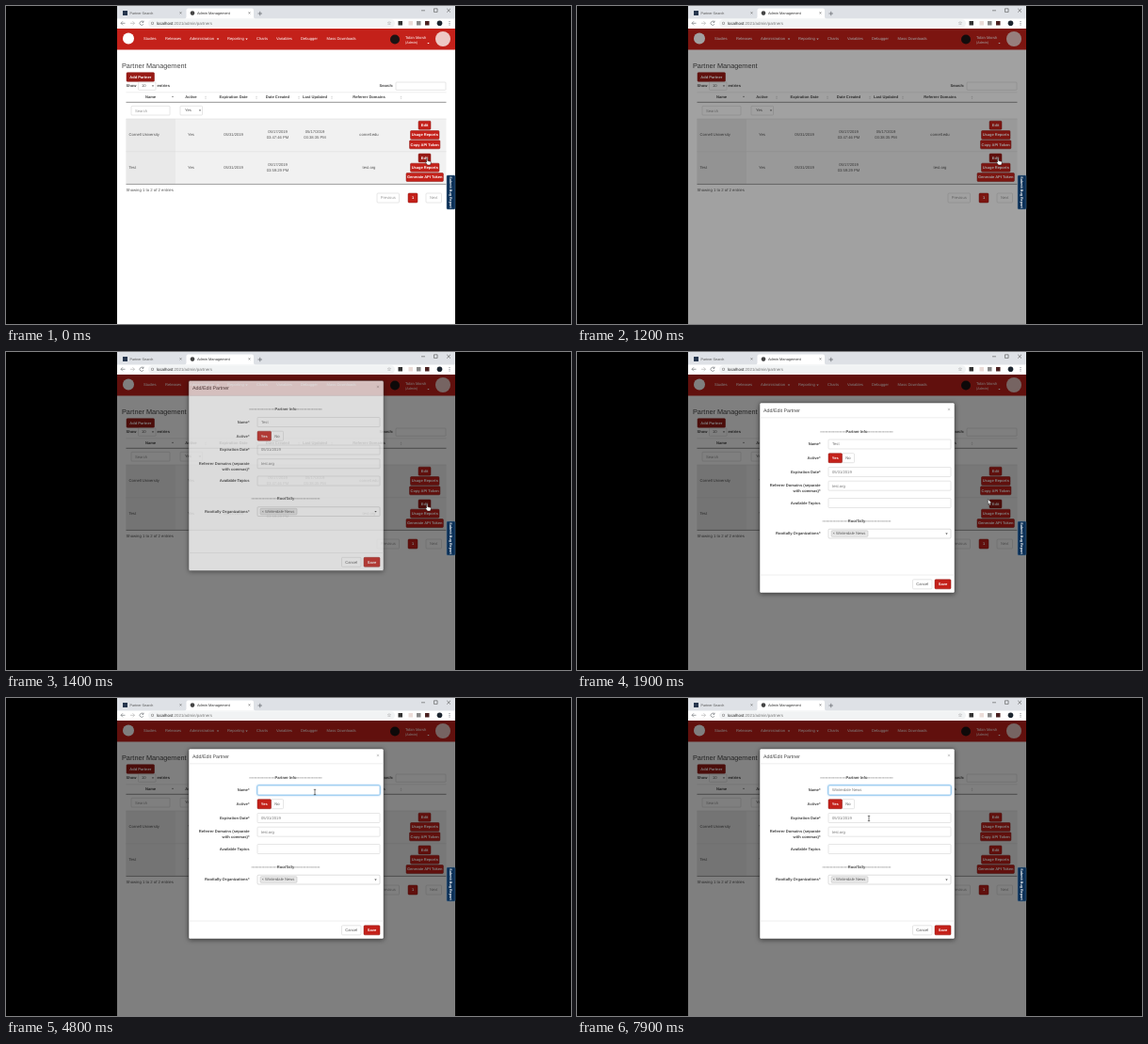
These frames come from a looping animation (600 by 338 pixels, 8000 ms). An HTML page:

```html
<!DOCTYPE html>
<html lang="en">
<head>
<meta charset="utf-8">
<title>Partner Management</title>
<style>
html, body { margin: 0; width: 100%; height: 100%; overflow: hidden; background: #000; }
svg { display: block; width: 100vw; height: 100vh; }
text { font-family: "Liberation Sans", Arial, sans-serif; text-rendering: geometricPrecision; white-space: pre; }
</style>
</head>
<body>
<svg id="stage" viewBox="0 0 600 338"></svg>
<script>
const RED = '#c4211a', DARK_RED = '#971a15', INK = '#555', BORDER = '#ccc';
const FIRST_NAME = 'Test', NEW_NAME = 'Winterdale News';

// Markup helpers; text is placed by its vertical centre.
const text = (x, y, s, { size = 4.15, fill = INK, bold, anchor = 'start', extra = '' } = {}) =>
  `<text x="${x}" y="${y + size * 0.35}" font-size="${size}" fill="${fill}" text-anchor="${anchor}"` +
  `${bold ? ' font-weight="bold"' : ''} ${extra}>${s}</text>`;
const mid = (x, y, s, o) => text(x, y, s, { anchor: 'middle', ...o });
const rect = (x, y, w, h, fill, stroke = 'none', r = 0, extra = '') =>
  `<rect x="${x}" y="${y}" width="${w}" height="${h}" fill="${fill}" stroke="${stroke}" stroke-width=".5" rx="${r}" ${extra}/>`;
const circle = (x, y, r, fill) => `<circle cx="${x}" cy="${y}" r="${r}" fill="${fill}"/>`;
const path = (d, stroke, width = 0.6, fill = 'none') =>
  `<path d="${d}" fill="${fill}" stroke="${stroke}" stroke-width="${width}"/>`;
const hline = (x1, x2, y, color, width = 0.5) => path(`M${x1} ${y}H${x2}`, color, width);
const button = (x, y, w, h, label, fill = RED, id = '') =>
  rect(x, y, w, h, fill, '#8d1712', 1, id && `id="${id}"`) +
  mid(x + w / 2, y + h / 2, label, { fill: '#fff', size: 4, bold: true });
const plainButton = (x, y, w, h, label, fill = INK) =>
  rect(x, y, w, h, '#fff', BORDER, 1) + mid(x + w / 2, y + h / 2, label, { fill });
const field = (x, y, w, h, value = '', id = '') =>
  rect(x, y, w, h, '#fff', BORDER, 0.8, id && `id="${id}"`) +
  text(x + 4, y + h / 2, value, { fill: '#777', extra: id && `id="${id}Text"` });
const triangle = (x, y, color = '#444', s = 1.2) =>
  path(`M${x - s} ${y - s / 2}h${2 * s}l${-s} ${s * 1.2}z`, 'none', 0, color);

function browser() {
  const gray = '#5f6368';
  return rect(118, 0, 359, 338, '#fff') + rect(118, 0, 359, 13.5, '#dee1e6') +
    rect(124, 5, 5, 5, '#26364d') + text(131.5, 7.6, 'Partner Search', { size: 3.7 }) +
    text(184, 7.6, '×', { size: 5 }) +
    path('M189.5 13.5q2 0 2-2V4.500q0-2 2-2H261q2 0 2 2v7q0 2 2 2z', 'none', 0, '#fff') +
    circle(198, 7.6, 2.3, '#444') + text(203, 7.6, 'Admin Management', { size: 3.9, fill: '#333' }) +
    text(257, 7.6, '×', { size: 5 }) + path('M267.500 8h4.500M269.750 5.750v4.500', gray, 0.7) +
    path('M441 4.800h4M454.500 2.800h3.600v3.600h-3.600zM468.200 2.800l3.800 3.800m0-3.800l-3.800 3.800', '#333', 0.5) +
    path('M126.500 18.300h-4.500m2-2l-2 2l2 2', gray) +
    path('M132 18.300h4.500m-2-2l2 2l-2 2', '#aaa') +
    path('M145.800 17a2.100 2.100 0 1 0 .2 2.200m0-3.600v1.700h-1.700', gray) +
    rect(151, 14.200, 262, 8.400, '#f1f3f4', 'none', 4.2) + circle(155.500, 18.300, 1.5, '#777') +
    circle(155.500, 18.300, 1, '#f1f3f4') +
    text(160, 18.400, 'localhost<tspan fill="#777">:2021/admin/partners</tspan>', { size: 4.4, fill: '#222' }) +
    mid(407, 18, '☆', { size: 5.5 }) +
    rect(416.500, 16, 4.500, 4.500, '#333') + rect(427.500, 16, 4.500, 4.500, '#eadcd8') +
    rect(436, 16, 4.500, 4.500, '#888') + rect(445, 16, 4.500, 4.500, '#4a2020') +
    circle(460.500, 18.300, 2.8, '#1d2630') +
    [16.5, 18.3, 20.1].map(y => circle(471, y, 0.5, gray)).join('');
}

function navbar() {
  const items = [[146, 'Studies'], [169, 'Releases'], [195, 'Administration', 225], [235, 'Reporting', 255.5],
    [266, 'Charts'], [287, 'Variables'], [313, 'Debugger'], [340.500, 'Mass Downloads']];
  const white = { fill: '#fff', size: 4.1 };
  return rect(118, 24, 359, 22.500, RED) + circle(130, 34.500, 6, '#fff') +
    items.map(([x, s, arrow]) => text(x, 35, s, white) + (arrow ? triangle(arrow, 35.200, '#fff') : '')).join('') +
    circle(413, 35.500, 5, '#1c1313') + text(424, 33.200, 'Tobin Marsh', white) +
    text(424, 39.200, '(Admin)', { fill: '#fff', size: 3.7 }) + triangle(448.500, 39.500, '#fff') +
    circle(464, 35, 8, '#edc9c5');
}

function tableRow(y, name, created, updated, domain, token, tokenX, editId) {
  const center = y + 17, stamp = (x, [date, time]) => mid(x, center - 3, date) + mid(x, center + 3, time);
  return rect(127.500, y, 340, 34.700, '#f1f1f1') + rect(127.500, y, 52.500, 34.700, '#e9e9e9') +
    hline(127.500, 467.500, y, '#d5d5d5') +
    text(130.500, center, name) + mid(196.500, center, 'Yes') + mid(241.500, center, '05/31/2019') +
    stamp(288.500, created) + (updated ? stamp(328, updated) : '') + mid(385.500, center, domain) +
    button(438, y + 2.200, 13, 9, 'Edit', RED, editId) +
    button(429.500, y + 12.500, 30.500, 9, 'Usage Reports') +
    button(tokenX, y + 22.800, 2 * (444.700 - tokenX), 9, token);
}

function page() {
  const bold = { bold: true, fill: '#444', size: 4.1 };
  const heads = [[153.500, 'Name', 177], [196.500, 'Active', 212], [241.500, 'Expiration Date', 266],
    [288.500, 'Date Created', 311], [328, 'Last Updated', 346], [385.500, 'Referrer Domains', 419.500]];
  return navbar() + text(123, 63.500, 'Partner Management', { size: 7.3, fill: '#444' }) +
    button(128, 70.700, 29.500, 9.600, 'Add Partner', DARK_RED) +
    text(127.500, 85, 'Show', bold) + rect(140.500, 81, 18.500, 8.300, '#fff', BORDER, 0.8) +
    text(144, 85, '10') + triangle(156, 85) + text(160.500, 85, 'entries', bold) +
    text(411.500, 85, 'Search:', { ...bold, anchor: 'end' }) + field(414, 81, 53, 8.300) +
    hline(127.500, 467.500, 91.800, '#ddd') +
    heads.map(([x, s, sortX], i) => mid(x, 97, s, bold) +
      (i ? triangle(sortX, 98.300, '#ccc', 1) : '') +
      path(`M${sortX - 1} 96.700h2l-1-1.300z`, 'none', 0, i ? '#ccc' : '#555')).join('') +
    hline(127.500, 467.500, 102.300, '#666', 0.7) +
    field(133, 106.300, 41, 9.700, '<tspan fill="#999">Search</tspan>') +
    rect(185, 106.300, 23.500, 9.700, '#fff', BORDER, 0.8) + text(190, 111, 'Yes') + triangle(206, 111) +
    tableRow(120, 'Cornell University', ['05/17/2019', '03:47:46 PM'], ['05/17/2019', '03:38:35 PM'],
      'cornell.edu', 'Copy API Token', 428.500, '') +
    tableRow(154.700, FIRST_NAME, ['05/17/2019', '03:59:29 PM'], null,
      'test.org', 'Generate API Token', 425, 'edit') +
    hline(127.500, 467.500, 189.400, '#777', 0.7) +
    text(127.500, 195.500, 'Showing 1 to 2 of 2 entries', { size: 4.25 }) +
    plainButton(394, 199, 23.500, 10, 'Previous', '#999') + button(427, 199, 10, 10, '1') +
    plainButton(446, 199, 16.500, 10, 'Next', '#999');
}

function modal() {
  const bold = { bold: true, fill: '#444', size: 4.1 };
  const label = (y, s) => text(258.500, y, s, { ...bold, anchor: 'end' });
  const dashes = '-'.repeat(20);
  return rect(194, 54, 207, 202, '#fff', '#555', 1.5, 'style="filter:drop-shadow(0 1.5px 2.500px #0008)"') +
    text(198, 62, 'Add/Edit Partner', { size: 5.3, fill: '#444' }) +
    mid(395, 60.500, '×', { size: 6, fill: '#aaa' }) + hline(194, 401, 69.800, '#ddd') +
    mid(297, 84.300, dashes + 'Partner Info' + dashes, bold) +
    label(98, 'Name*') + field(267, 93, 130, 10, FIRST_NAME, 'name') +
    label(112.800, 'Active*') + plainButton(281.500, 107.700, 13, 10, 'No') + button(267, 107.700, 14.500, 10, 'Yes') +
    label(127.500, 'Expiration Date*') + field(267, 122.500, 130, 10, '05/31/2019') +
    label(142, 'Referrer Domains (separate') + label(148, 'with commas)*') + field(267, 137.200, 130, 10, 'test.org') +
    label(160.500, 'Available Topics') + field(267, 155.500, 130, 10) +
    mid(297, 179.300, dashes + 'RootTally' + dashes, bold) +
    label(193, 'Roottally Organizations*') + rect(267, 188.200, 130, 9.800, '#fff', '#bbb', 1) +
    rect(270, 189.800, 39, 6.500, '#e8e8e8', '#bbb', 1) + text(271.500, 193, '× ' + NEW_NAME) +
    triangle(392.500, 193.200) + hline(194, 401, 237, '#ddd') +
    plainButton(356.500, 241.800, 20.500, 10, 'Cancel') + button(380, 241.800, 17, 10, 'Save');
}

const bugTab = rect(468, 180, 9, 36, '#0c3158', '#52708f', 1) +
  mid(0, 0, 'Submit Bug Report', { size: 3.7, bold: true, fill: '#fff', extra: 'transform="translate(472.600 198) rotate(90)"' });

const cursors = {
  hand: path('M0 0q.8-.8 1.300 0v2.500l3 .8q.7.300.5 1.500l-.7 2.200h-3l-2.200-2.700q.2-.9 1.100-.3z', '#111', 0.5, '#fff'),
  arrow: path('M0 0v5.600l1.300-1.200l.9 2l.9-.4l-.9-2h1.800z', '#111', 0.4, '#fff'),
  beam: path('M-1.200-2.700h2.400M0-2.700v5.400M-1.200 2.700h2.400', '#222', 0.6),
};

document.getElementById('stage').innerHTML =
  `<rect width="600" height="338"/>${browser()}${page()}` +
  `<rect id="backdrop" x="118" y="24" width="359" height="314"/>${bugTab}<g id="modal">${modal()}</g>` +
  `<g id="cursor">${Object.entries(cursors).map(([k, v]) => `<g id="${k}">${v}</g>`).join('')}</g>`;

const $ = id => document.getElementById(id);
const clamp = v => Math.min(1, Math.max(0, v));
const span = (t, start, length) => clamp((t - start) / length);
const smooth = p => p * p * (3 - 2 * p);

// CSS ease-out, cubic-bezier(0, 0, .58, 1), solved by bisection.
function easeOut(p) {
  let lo = 0, hi = 1;
  for (let i = 0; i < 20; i++) {
    const u = (lo + hi) / 2;
    if (1.74 * u * u * (1 - u) + u ** 3 < p) lo = u; else hi = u;
  }
  return lo * lo * (3 - 2 * lo);
}

// Pointer moves: start time, duration, destination.
const moves = [[1720, 980, 333, 100], [3600, 500, 328, 100], [7250, 600, 310, 128]];

function pointer(t) {
  let x = 446.5, y = 162;
  for (const [start, length, toX, toY] of moves) {
    const p = smooth(span(t, start, length));
    x += (toX - x) * p;
    y += (toY - y) * p;
  }
  const overField = x > 267 && x < 397 && [93, 122.5].some(top => y > top && y < top + 10);
  return { x, y, kind: t < moves[0][0] ? 'hand' : overField ? 'beam' : 'arrow' };
}

function nameValue(t) {
  if (t < 5200) return FIRST_NAME.slice(0, 4 - Math.floor(4 * span(t, 3750, 600)));
  return NEW_NAME.slice(0, Math.floor((t - 5200) / 110));
}

function draw(now) {
  const t = Math.floor(now % 8000 / 100) * 100;
  const focused = t >= 2800;
  $('backdrop').setAttribute('opacity', 0.5 * span(t, 1090, 150));
  $('modal').setAttribute('opacity', span(t, 1290, 150));
  $('modal').setAttribute('transform', `translate(0 ${-50 * (1 - easeOut(span(t, 1290, 300)))})`);
  $('edit').setAttribute('fill', focused ? RED : DARK_RED);
  $('name').setAttribute('stroke', focused ? '#4fa3e0' : BORDER);
  $('name').style.filter = focused ? 'drop-shadow(0 0 1px #66afe9)' : '';
  $('nameText').textContent = nameValue(t);
  const { x, y, kind } = pointer(t);
  $('cursor').setAttribute('transform', `translate(${x} ${y})`);
  for (const k in cursors) $(k).style.display = k === kind ? '' : 'none';
}

const begin = performance.now();
(function frame() {
  draw(performance.now() - begin);
  requestAnimationFrame(frame);
})();
</script>
</body>
</html>
```
